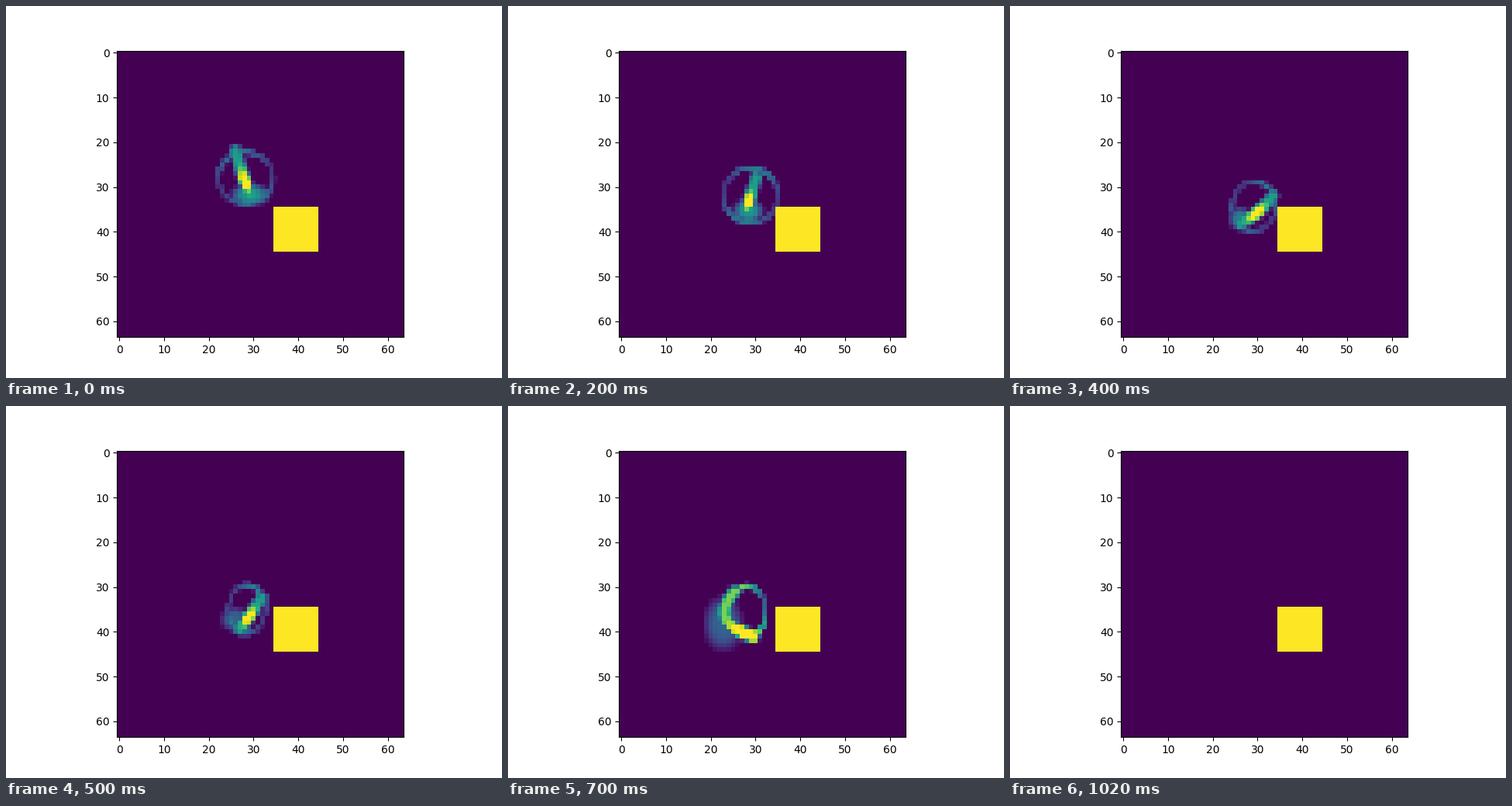
Recreate the animation shown at these times as a matplotlib script. Size 640 px wide and 480 px high, loop 4000 ms.

```python
import numpy as np
import matplotlib.pyplot as plt
from matplotlib.animation import FuncAnimation

SIZE, STEP, LOOP = 64, 20, 4000
Y, X = np.mgrid[:SIZE, :SIZE].astype(float)
S = np.linspace(0, 1, 40)[:, None, None]

# Key points of the body: times, then the bright band as a curve head, bend, tail
TIMES = (0, 100, 320, 500, 700)
HEAD = (26, 22), (26.4, 24.8), (34.8, 31.5), (31.8, 32.5), (25.2, 31.2)
BEND = (27.8, 28.5), (27, 29), (31, 36), (29.5, 36), (19.3, 38)
TAIL = (29.5, 32), (30, 33), (25.5, 37.5), (27, 39.5), (29.5, 41)
HOT = .6, .85, .5, .6, .95          # brightest place along the band
SAC = (29.3, 31.8), (30, 33.9), (26.5, 37.2), (25.8, 37.3), (22.8, 38.2)
SAC_SIZE = (3.8, 2.2), (3.9, 2.5), (1.9, 2.3), (2.8, 2.5), (3.9, 5.4)


def along(t, keys):
    """Values at time t on a straight path through the keys."""
    return [np.interp(t, TIMES, k) for k in zip(*keys)]


def ease(t, a, b):
    u = np.clip((t - a) / (b - a), 0, 1)
    return u * u * (3 - 2 * u)


def soft(r):
    return np.exp(-r ** 4)


def membrane(t, lean):
    """Thin ellipse that sinks, is squeezed by the block and glows at its poles."""
    cx = 28.2 + 1.3 * np.exp(-((t - 320) / 150) ** 2)
    cy = 28 + 8 * np.tanh(t / 370)
    rx = 6.1 - 2 * ease(t, 280, 480)
    ry = 5.7 + .4 * np.sin(t / 110)
    dx, dy = (X - cx) / rx, (Y - cy) / ry
    off = (np.hypot(dx, dy) - 1) * (rx + ry) / 2
    glow = .28 + .27 * ease(t, 450, 700)
    return glow * (1 + .45 * np.cos(2 * (np.arctan2(dy, dx) - lean))) * soft(off / .65)


def band(t, head, bend, tail):
    x, y = ((1 - S) ** 2 * a + 2 * S * (1 - S) * b + S ** 2 * c
            for a, b, c in zip(head, bend, tail))
    value = .55 + .25 * ease(t, 500, 700)
    value = value + .6 * np.exp(-((S - np.interp(t, TIMES, HOT)) / .22) ** 2)
    return (value * soft(np.hypot(X - x, Y - y) / 1.35)).max(axis=0)


def sac(t):
    (x, y), (w, h) = along(t, SAC), along(t, SAC_SIZE)
    value = .52 - .2 * ease(t, 320, 500)
    return value * soft(np.hypot((X - x) / w, (Y - y) / h))


def field(t):
    head, bend, tail = (along(t, k) for k in (HEAD, BEND, TAIL))
    lean = np.arctan2(tail[1] - head[1], tail[0] - head[0])
    cells = np.maximum(membrane(t, lean), band(t, head, bend, tail))
    cells = np.maximum(cells, sac(t))
    # The body starves: every cell loses more and more until none is left
    cells = np.minimum(cells, 1) - 1.2 * (max(t - 700, 0) / 300) ** 2
    cells[cells < .035] = 0
    cells[35:45, 35:45] = 1
    return cells


fig, ax = plt.subplots(figsize=(6.4, 4.8), dpi=100)
image = ax.imshow(field(0), cmap="viridis", vmin=0, vmax=1, interpolation="nearest")


def update(n):
    image.set_data(field(n * STEP))
    return [image]


anim = FuncAnimation(fig, update, frames=LOOP // STEP, interval=STEP,
                     repeat=True, repeat_delay=0, blit=False)
plt.show()
```
